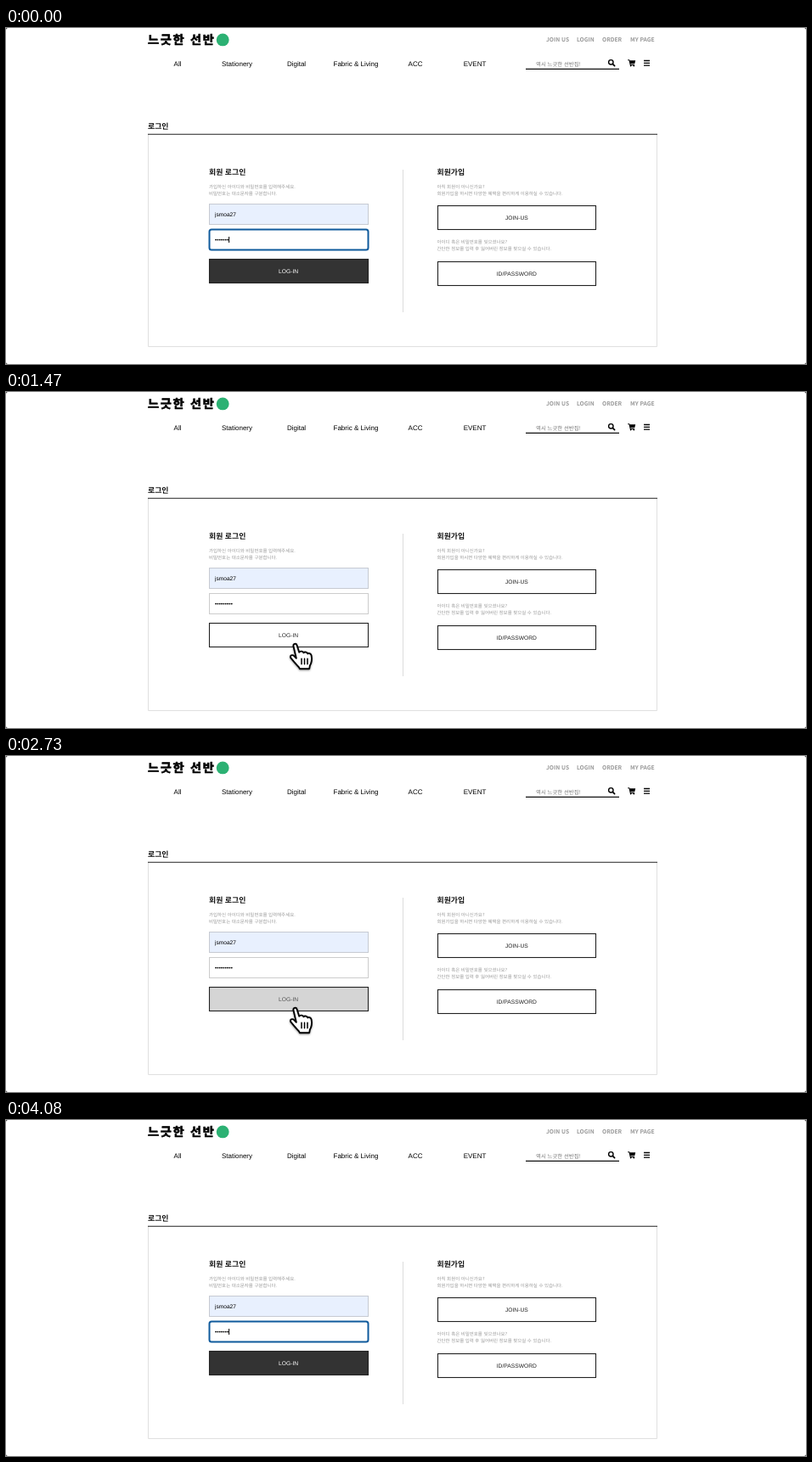
An HTML page that plays this animation: 942 by 396 pixels, repeating every 4.11 s.

```html
<!DOCTYPE html>
<html lang="ko">
<head>
<meta charset="utf-8">
<title>Login</title>
<style>
  html, body { margin: 0; width: 100%; height: 100%; overflow: hidden; background: #fff; }
  svg { display: block; width: 100%; height: 100%; }
  text { white-space: pre; text-rendering: geometricPrecision; }
  .arial { font-family: "Liberation Sans", Arial, sans-serif; }
  .ko { font-family: "Noto Sans CJK KR", "Noto Sans CJK", sans-serif; }
  #cursor { filter: drop-shadow(0 1.5px 1.2px rgba(0, 0, 0, .4)); }
</style>
</head>
<body>
<svg id="stage" viewBox="0 0 942 396" xmlns="http://www.w3.org/2000/svg"></svg>
<script>
const STEP = 30, LOOP = 4110, STEPS = LOOP / STEP;
const USER = 'jsmoa27', INK = '#222', GREEN = '#2cb173';

const text = (cls, str, x, y, size, fill = '#111', extra = '') =>
  `<text class="${cls}" x="${x}" y="${y}" font-size="${size}" fill="${fill}" ${extra}>${str}</text>`;
const ko = (...args) => text('ko', ...args);
const arial = (...args) => text('arial', ...args);
const rect = (x, y, w, h, fill, extra = '') =>
  `<rect x="${x}" y="${y}" width="${w}" height="${h}" fill="${fill}" ${extra}/>`;
const path = (d, stroke, width, extra = 'fill="none"') =>
  `<path d="${d}" stroke="${stroke}" stroke-width="${width}" ${extra}/>`;
const MID = 'text-anchor="middle"', BOLD = 'font-weight="700"', ROUND = 'fill="none" stroke-linecap="round" stroke-linejoin="round"';

const logo = (x, y, scale) => `<g transform="translate(${x} ${y}) scale(${scale})">
  ${ko('느긋한 선반', 0, 229, 69, '#000', 'font-weight="900" letter-spacing="8" stroke="#000" stroke-width="3" stroke-linejoin="round"')}
  <circle cx="426" cy="203" r="36" fill="${GREEN}"/></g>`;

const links = list => list.map(([str, x]) => ko(str, x, 16, 6.7, '#999', BOLD)).join('');

// Shared top bar, in login page coordinates
function header() {
  const nav = ['All', 'Stationery', 'Digital', 'Fabric &amp; Living', 'ACC', 'EVENT'];
  return logo(167, -28.1, .207) +
    nav.map((str, i) => arial(str, 202 + 70 * i, 45, 8, '#000', MID)).join('') +
    ko('역시 느긋한 선반집!', 624, 45, 6.4, '#757575') +
    path('M612 48.4H722', '#111', 1.2) +
    '<circle cx="712.3" cy="40.3" r="2.7" fill="none" stroke="#000" stroke-width="1.4"/>' +
    path('M714.4 42.4L716.6 44.6', '#000', 1.7, ROUND) +
    '<path d="M732.2 37.2H734.2L734.5 38.3H741.2L740.2 42.2H735.4L735.6 43H740V44H734.8L733.5 38.2H732.2Z"/>' +
    '<circle cx="735.7" cy="44.6" r=".9"/><circle cx="739.3" cy="44.6" r=".9"/>' +
    path('M751 38.5H758M751 41.3H758M751 44.1H758', '#000', 1.3);
}

function loginPage() {
  const note = (str, x, y) => ko(str, x, y, 5.48, '#9a9a9a');
  const button = (str, y) => rect(508.5, y, 186, 28, '#fff', `stroke="${INK}" stroke-width="1.1"`) +
    arial(str, 601.3, y + 16.6, 6.7, INK, MID);
  return header() +
    links([['JOIN US', 636], ['LOGIN', 672], ['ORDER', 702], ['MY PAGE', 735]]) +
    ko('로그인', 167, 118.6, 8.9, '#111', BOLD) +
    path('M167.5 125V375.5H766.5V125', '#e0e0e0', 1) +
    path('M167 125.3H767', INK, 1.1) +
    path('M467.5 167V335', '#ddd', 1) +
    ko('회원 로그인', 239, 172.8, 8.9, '#111', BOLD) +
    note('가입하신 아이디와 비밀번호를 입력해주세요.', 239, 189) +
    note('비밀번호는 대소문자를 구분합니다.', 239, 197) +
    rect(239.5, 207.5, 187, 24, '#e8f0fe', 'stroke="#c6cad2"') +
    arial(USER, 246, 222, 6.6, '#000') +
    rect(239.5, 237.5, 187, 24, '#fff', 'id="field"') +
    '<g id="dots"></g>' + path('M0 246V253', '#000', 1, 'id="caret"') +
    rect(239.5, 272.5, 187, 28, '#333', `id="login" stroke="${INK}" stroke-width="1.1"`) +
    arial('LOG-IN', 332.6, 289, 6.7, '#fff', MID + ' id="label"') +
    ko('회원가입', 507.5, 172.8, 8.9, '#111', BOLD) +
    note('아직 회원이 아니신가요?', 507.5, 189) +
    note('회원가입을 하시면 다양한 혜택을 편리하게 이용하실 수 있습니다.', 507.5, 197) +
    button('JOIN-US', 209.5) +
    note('아이디 혹은 비밀번호를 잊으셨나요?', 507.5, 253.8) +
    note('간단한 정보를 입력 후 잃어버린 정보를 찾으실 수 있습니다.', 507.5, 261.8) +
    button('ID/PASSWORD', 275.5);
}

function homePage() {
  const arrow = (x, dir) => `<g transform="translate(${x} 208.7) scale(${dir} 1)">
    <circle r="10.2" fill="#fff" stroke="#666" stroke-width="1.9"/>
    ${path('M-1.6 -4.6L3 0L-1.6 4.6', '#666', 2.3)}</g>`;
  const dino = '<path d="M599.5 9.5L602 8.5L605 10L605.5 12.5L608 14L610.5 17.5L607.5 16.3L607 18.3H605.3L605 16.5L603.3 18.3H602L603 15L602 12.3L600 11.8Z" fill="#5c8a2e"/>';
  const photos = `<clipPath id="crop">${rect(160, 367, 180, 29, '#000')}${rect(370, 367, 180, 29, '#000')}</clipPath>
    <linearGradient id="wall"><stop stop-color="#d2d2d5"/><stop offset="1" stop-color="#dcdce0"/></linearGradient>
    <linearGradient id="wood"><stop stop-color="#5a3320"/><stop offset="1" stop-color="#7d4a2c"/></linearGradient>
    <g clip-path="url(#crop)">
    ${rect(160, 367, 180, 29, '#cacace')}
    <path d="M160 371L262 396H160Z" fill="#dcd6f5"/>
    ${path('M160 374L238 396', '#a593ea', 1.5)}
    ${rect(370, 367, 180, 29, 'url(#wood)')}
    <path d="M370 374L398 367H478L503 396H370Z" fill="#2b2928"/>
    ${path('M505 367L550 379M495 374L550 389', '#55301d', 1.5)}
    ${path('M440 388L444 396M449 388V394L454 391M458 376L463 391', '#e4e4e4', 1.7, ROUND)}
    </g>${rect(580, 367, 180, 29, 'url(#wall)')}`;
  return `<g transform="translate(-7 0)">${header()}</g>` +
    ko('WELCOME', 535.5, 16.5, 6.1, '#999', BOLD) +
    ko(USER, 568.5, 16.5, 7, GREEN, BOLD) + dino +
    links([['MODIFY', 622], ['LOGOUT', 657], ['ORDER', 694], ['MY PAGE', 727]]) +
    logo(213, 0, 1) + arrow(136, -1) + arrow(783.3, 1) +
    rect(425.5, 321.5, 37, 6, '#969696', 'rx="2.5" stroke="#777"') +
    [466, 476.3, 486.7].map(x => rect(x, 321, 7.4, 7, '#c2c2c2', 'rx="3"')).join('') + photos;
}

const ibeam = 'M-5 -15.5Q0 -15.5 0 -11V11Q0 15.5 -5 15.5M5 -15.5Q0 -15.5 0 -11V11Q0 15.5 5 15.5';
const cursors = {
  ibeam: path(ibeam, '#fff', 4) + path(ibeam, '#000', 1.8),
  arrow: path('M1.2 1.8V27L6.7 21.8L11 32.2L15.6 30.2L11.3 20H18.6Z', '#fff', 2.4, 'paint-order="stroke"'),
  hand: path('M-3.3 2.6C-4 -.6 -.2 -1.6 .8 1.4L3.4 9.6C4.6 7.8 8 8.2 8.6 10.2C10 8.6 12.8 9.4 13.4 11.2C15.4 10 17.4 11.4 17.8 13.4C18.8 18.4 18.4 21.4 16 25.4L15.4 29H4L3 27C.4 24.6 -3 20.4 -6.6 16C-8 13.4 -4.6 11.8 -2.6 14L0 16.6Z', '#000', 1.9, 'fill="#fff" stroke-linejoin="round"') +
    path('M6.2 17V23.6M9.7 17V23.6M13.2 17V23.6', '#000', 1.5, ROUND)
};

const $ = id => document.getElementById(id);
$('stage').innerHTML = rect(0, 0, 942, 396, '#333') + rect(0, 0, 942, 396, '#fff', 'rx="2.5"') +
  `<g id="loginPage">${loginPage()}</g><g id="homePage">${homePage()}</g><g id="cursor">` +
  Object.keys(cursors).map(name => `<g id="${name}">${cursors[name]}</g>`).join('') + '</g>';
$('dots').innerHTML = Array.from({ length: 9 }, (_, i) =>
  `<circle cx="${247.1 + 2.33 * i}" cy="249.6" r=".95"/>`).join('');

const show = (el, on) => el.setAttribute('visibility', on ? 'inherit' : 'hidden');
const set = (el, attrs) => { for (const key in attrs) el.setAttribute(key, attrs[key]); };
const gray = v => `rgb(${v},${v},${v})`;

// Pointer route and first brief hover: [step, values...]
const route = [[24, 307, 216], [30, 311, 217], [32, 317.5, 228.5], [34, 327, 273], [35, 332, 296],
  [36, 335.5, 306], [38, 336, 306], [42, 341, 299], [44, 341.8, 297.2]];
const brush = [[34, 0], [35, .1], [36, .05], [38, 0]];

function at(keys, k) {
  if (k <= keys[0][0]) return keys[0].slice(1);
  for (let i = 1; i < keys.length; i++) {
    const [a, ...from] = keys[i - 1], [b, ...to] = keys[i];
    if (k <= b) return from.map((v, j) => v + (to[j] - v) * (k - a) / (b - a));
  }
  return keys[keys.length - 1].slice(1);
}

// CSS "ease": cubic-bezier(.25, .1, .25, 1)
function ease(p) {
  if (p <= 0 || p >= 1) return Math.min(1, Math.max(0, p));
  const bez = (a, b, s) => 3 * a * s * (1 - s) ** 2 + 3 * b * s * s * (1 - s) + s ** 3;
  let lo = 0, hi = 1;
  for (let i = 0; i < 20; i++) {
    const mid = (lo + hi) / 2;
    if (bez(.25, .25, mid) < p) lo = mid; else hi = mid;
  }
  return bez(.1, 1, lo);
}

function draw(time) {
  const step = Math.floor(time % LOOP / STEP);
  const k = Math.min(step, STEPS - step);
  const home = k >= 55;
  show($('loginPage'), !home);
  show($('homePage'), home);

  const typed = k < 2 ? 7 : k < 16 ? 8 : 9;
  [...$('dots').children].forEach((dot, i) => show(dot, !home && i < typed));
  set($('caret'), { transform: `translate(${246.3 + 2.33 * typed} 0)` });
  show($('caret'), !home && k < 30);
  set($('field'), k < 43 ? { stroke: '#0f5a9c', 'stroke-width': 2, rx: 2.5 }
    : { stroke: '#ccc', 'stroke-width': 1, rx: 0 });

  const hover = k < 42 ? at(brush, k)[0] : ease((k - 43) / 6.1);
  set($('login'), { fill: gray(Math.round(51 + 204 * hover)) });
  set($('label'), { fill: gray(Math.round(255 - 215 * hover)) });

  const [x, y] = at(route, k);
  const kind = k < 30 ? 'ibeam' : k < 42 || k === 68 ? 'arrow' : 'hand';
  set($('cursor'), { transform: `translate(${x} ${y})` });
  show($('cursor'), k >= 24);
  for (const name in cursors) $(name).setAttribute('display', name === kind ? 'inline' : 'none');
}

const start = performance.now();
(function tick() {
  draw(performance.now() - start);
  requestAnimationFrame(tick);
})();
</script>
</body>
</html>
```
